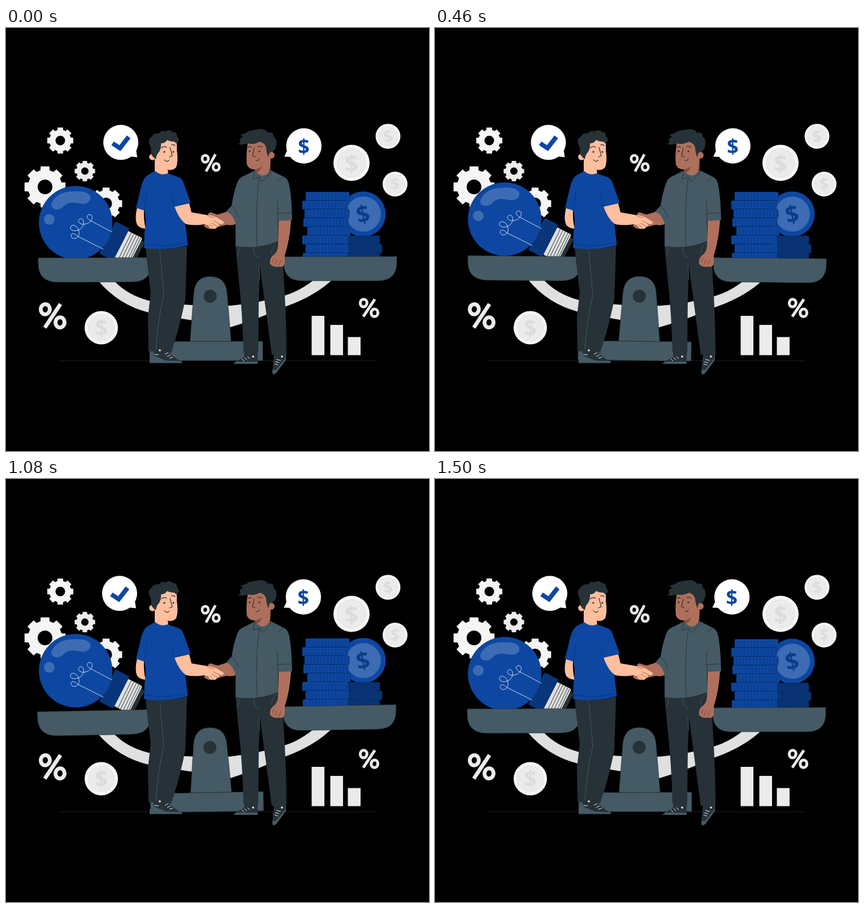
An HTML page that plays this animation: 748x748 px, repeating every 1.54 s.

```html
<!DOCTYPE html>
<html lang="en">
<head>
<meta charset="utf-8">
<title>Balance</title>
<style>
html, body { margin: 0; height: 100%; overflow: hidden; background: #000; }
svg { display: block; width: 100vw; height: 100vh; }
text { font: 700 42px "Open Sans", sans-serif; text-anchor: middle; }
.blue { fill: #0d47a1; }
.slate { fill: #455a64; }
.dark { fill: #263238; }
.skin { fill: #ffbe9d; }
.tan { fill: #ae705c; }
.edge { stroke: #263238; stroke-width: .7; }
.line { fill: none; stroke: #263238; stroke-width: .9; stroke-linecap: round; stroke-linejoin: round; }
.lace { fill: none; stroke: #eee; stroke-width: 1; }
</style>
</head>
<body>
<svg viewBox="0 0 748 748">
  <path d="M93 588.5H655" stroke="#263238" stroke-width=".7"/>
  <g id="backdrop"></g>
  <path fill="#ebebeb" d="M540.5 509H563V578.5H540.5ZM573.5 525H596V578.5H573.5ZM604.5 546.5H627V578.5H604.5Z"/>

  <g id="bulb">
    <g transform="translate(123 344) rotate(27)">
      <rect x="114" y="-24" width="11" height="42" rx="4" class="dark"/>
      <rect x="88" y="-29" width="30" height="54" rx="3" fill="#e0e0e0"/>
      <path class="line" d="M96 -29L97 25M101 -29L102 25M106 -29L107 25M111 -29L112 25M115 -28L116 24"/>
      <rect x="62" y="-34" width="28" height="64" rx="3" fill="#09357a"/>
    </g>
    <circle cx="123.2" cy="344.3" r="65" class="blue"/>
    <g fill="#fff" opacity=".2">
      <path d="M80 312C85 297 100 289 118 289C135 287 147 291 149 298C151 309 138 313 128 310C115 307 108 309 101 316C94 324 80 322 80 312Z"/>
      <circle cx="76.5" cy="338.5" r="9.5"/>
    </g>
    <path fill="none" stroke="#fff" stroke-width=".8" d="M188 361L150 341C140 336 143 329 149 330C156 332 152 343 143 346C131 350 125 342 130 338C136 334 141 345 134 353C127 361 113 360 114 352C116 345 128 350 129 360C131 370 122 375 117 371C112 366 118 359 126 368L172 391"/>
  </g>

  <g id="money">
    <circle cx="631.5" cy="329" r="40" class="blue"/>
    <circle cx="632" cy="329" r="31" fill="#3d6cb4"/>
    <text x="631" y="344" transform="rotate(-12 631 329)" fill="#0b3d8b">$</text>
  </g>

  <g id="scale">
    <path fill="#e0e0e0" d="M164 448Q200 490 252 503Q285 510 330 517L361 530L397 529Q450 513 493 493Q545 475 577 445H545Q520 465 493 473Q450 486 397 491L330 490Q285 488 252 482Q215 472 192 448Z"/>
    <g class="slate edge">
      <path d="M57 406.5L257 405.9V417Q257 449 222 449L89 449.5Q57 448 57 416Z"/>
      <path d="M491 404.5L691 404V414Q691 447 658 447H523Q491 447 491 414Z"/>
      <path d="M254 554.5L454 554V588H254Z"/>
      <path d="M325.5 554L332 470Q334 439.5 361 439.5Q389 439.5 391 470L398 554Z"/>
    </g>
    <circle cx="361" cy="474.5" r="11.5" class="dark"/>
  </g>

  <g id="check">
    <path fill="#fff" d="M230 215L232 228.5L218 227Z"/>
    <circle cx="203" cy="202.3" r="31" fill="#fff"/>
    <path fill="none" stroke="#0d47a1" stroke-width="8" d="M188.5 204L201.5 212.5L217 192.5"/>
  </g>
  <g id="price">
    <path fill="#fff" d="M498 215L492 227.5L508 228Z"/>
    <circle cx="526.7" cy="208.5" r="31.2" fill="#fff"/>
    <text x="526.5" y="221.5" style="font-size:36px" class="blue">$</text>
  </g>

  <g id="left-man">
    <path class="slate" d="M254 585L262 570L284 569Q296 583 311 590V592.5H254Z"/>
    <path class="dark" d="M261 571L284 569Q296 583 309 589L283 588L261 579Z"/>
    <path class="lace" d="M281 577l6 -3M285 581l6 -3M289 584l6 -2M262 577l8 1"/>
    <path class="dark" d="M247 389Q285 394 320 385Q319 430 317 480Q307 530 292 574Q272 571 252 572L251 510L256 468Q250 420 247 389Z"/>
    <path class="line" style="stroke:#4a5a62" d="M272 394L279 472Q268 520 265 568"/>
    <circle cx="272" cy="570" r="1.8" fill="#eee"/>
    <path class="skin" d="M232 317L244 321Q243 340 247 355Q236 354 232 348Q227 338 232 317Z"/>
    <path class="skin" d="M263 206L272 194H300Q303 206 302 215Q305 235 301 246Q297 252 286 250.5L287 258Q276 265 263 257Z"/>
    <path fill="#eb996e" d="M278 247Q284 251 297 250Q292 252 286 251Z"/>
    <circle cx="259" cy="228" r="5.8" class="skin"/>
    <path class="dark" d="M256 222Q258 213 254 207Q250 197 257 193Q261 185 271 186Q275 180 282 183Q290 178 295 184Q303 184 302 191Q308 197 304 202Q301 206 298 201Q290 201 285 198Q281 204 274 204Q275 212 271 219Q266 223 265 232Q260 229 256 222Z"/>
    <path class="line" d="M275 212Q279 208 284 211M293 207Q296 205 299 208M290 211L294 226L289 228M280 233Q284 238 288 234" style="stroke-width:1.2"/>
    <circle cx="280" cy="219" r="1.6" class="dark"/><circle cx="296" cy="219" r="1.6" class="dark"/>
    <path class="blue" d="M264 253L250 260.500Q243 265 239.500 279L230 318L245 323Q249 345 245 360L244 389Q284 395 321.500 384L317 345L298 316L326.500 309L314 274Q311 265 303 263L286 257Q274 262 264 253Z"/>
    <path class="line" d="M245 323L249 290M298 316L291 292M246 382Q285 389 320 379" style="stroke:#0a347a"/>
  </g>

  <g id="right-man">
    <path class="slate" d="M420 573H445V594H402Q408 588 420 582Z"/>
    <path class="dark" d="M421 573H445V590H404Q412 587 421 582Z"/>
    <path class="slate" d="M475 575L495 576V587L478 610Q471 616 471 608Z"/>
    <path class="dark" d="M476 575L494 576V584L477 605L472 604Z"/>
    <path class="lace" d="M417 585l4 4M422 583l4 4M427 581l4 4M476 590l7 2M475 594l6 2M478 586l8 2"/>
    <circle cx="437" cy="581" r="1.8" fill="#eee"/><circle cx="488" cy="581" r="1.8" fill="#eee"/>
    <path class="dark" d="M406 386Q445 392 481 377Q491 400 491 440Q496 510 496 577L470 578L449 421L447 480L446 574H420Q418 500 411 440Z"/>
    <path class="line" style="stroke:#4a5a62" d="M447 421L449 445M438 388Q437 403 447 405M412 390Q412 402 408 404M477 381Q470 390 469 398"/>
    <path class="tan" d="M482 340L504 340Q502 375 493 402V416Q491 424 483 422Q472 424 467 417Q466 408 471 403Q480 398 481 385Z"/>
    <path class="line" style="stroke:#70412f" d="M471 414L474 407M476 418L479 410M483 419L486 411"/>
    <path class="tan" d="M428 199Q424 225 426 242Q431 251 440 250L439 258Q455 270 467 254L468 230L465 198Z"/>
    <path fill="#84503f" d="M440 250Q448 249 453 244Q449 257 440 256Z"/>
    <circle cx="469" cy="225" r="6" class="tan"/>
    <path class="dark" d="M410 205Q416 203 414 200Q411 196 419 193Q416 188 412 189Q424 187 428 183Q437 180 443 180Q457 176 463 185Q474 183 473 192Q480 197 478 207Q477 215 471 219Q465 217 464 229Q460 219 460 211Q457 203 449 201Q438 207 427 204Q419 208 410 205Z"/>
    <path class="line" d="M428 211Q431 208 434 211M445 210Q449 208 453 211M439 212L436 226L441 228M442 234Q446 236 448 231" style="stroke-width:1.2"/>
    <circle cx="431" cy="218" r="1.6" class="dark"/><circle cx="448" cy="218" r="1.6" class="dark"/>
    <path class="slate" d="M440 252L418 263Q411 266 408 276Q402 293 399 314L388 326Q400 332 406 348L406 386Q445 392 481 377V341L506 340Q505 295 500 274Q498 266 489 262L467 251Q455 270 440 252Z"/>
    <path class="line" d="M440 252L437 268L448 263L453 272L468 257L466 250M448 264Q441 310 444 388M399 314Q408 322 411 334M481 341L480 305M480 328L505 327M480 272L492 262"/>
  </g>

  <g id="handshake">
    <path class="tan" d="M390 325Q401 329 406 346Q402 350 390 348L362 355Q354 355 350 350L357 333Q356 327 362 326L374 330Z"/>
    <path class="skin" d="M298 316L324 310L328 326L357 331Q366 331 374 336L384 342Q388 346 380 347L376 346Q378 351 374 351Q372 356 366 355Q360 356 358 349L351 347Q335 350 319 347Q307 340 298 316Z"/>
    <path class="line" style="stroke:#a45d40" d="M364 345L374 351M361 348L367 355M367 341L377 346M357 332Q361 335 368 335"/>
  </g>
</svg>
<script>
const $ = id => document.getElementById(id);
const add = (id, markup) => $(id).insertAdjacentHTML('beforeend', markup);

function gear(x, y, r, hole, fill) {
  const at = (radius, a) => `${x + radius * Math.sin(a)} ${y - radius * Math.cos(a)}`;
  const body = r * .82;
  let d = '';
  for (let i = 0; i < 8; i++) {
    const a = i * Math.PI / 4;
    d += `${i ? 'L' : 'M'}${at(body, a - .27)}L${at(r, a - .21)}L${at(r, a + .21)}L${at(body, a + .27)}`;
  }
  d += `ZM${x - hole} ${y}a${hole} ${hole} 0 1 0 ${2 * hole} 0a${hole} ${hole} 0 1 0 ${-2 * hole} 0Z`;
  add('backdrop', `<path d="${d}" fill="${fill}" fill-rule="evenodd"/>`);
}

function paleCoin(x, y, r, tilt) {
  add('backdrop', `<g transform="translate(${x} ${y}) scale(${r / 32}) rotate(${tilt})">
    <circle r="32" fill="#f5f5f5"/><circle r="25" fill="#ebebeb" stroke="#e0e0e0"/>
    <text y="15" fill="#dcdcdc">$</text></g>`);
}

function percent(x, y, scale, tilt) {
  add('backdrop', `<g transform="translate(${x} ${y}) scale(${scale}) rotate(${tilt})" fill="none" stroke="#ebebeb" stroke-width="6.8">
    <ellipse cx="-14" cy="-10.5" rx="8" ry="9"/><ellipse cx="14" cy="10.5" rx="8" ry="9"/>
    <path d="M12 -22L-12 22"/></g>`);
}

function stackCoin(x, y, width, fill) {
  let ridges = '';
  for (let i = 5; i < width; i += 6) ridges += `M${x + i} ${y + 3}v10`;
  add('money', `<rect x="${x}" y="${y}" width="${width}" height="15.4" rx="1.5" fill="${fill}" stroke="#08306e" stroke-width=".7"/>
    <path d="${ridges}M${x + 4} ${y + 14.5}h${width - 10}" stroke="#09347a"/>`);
}

gear(69, 281, 37, 13, '#f5f5f5');
gear(96, 199, 23.5, 8.5, '#f5f5f5');
gear(139.5, 253, 18.5, 6.5, '#ebebeb');
gear(177, 310.5, 29, 10.5, '#f5f5f5');
paleCoin(611, 238.5, 32, 0);
paleCoin(675.5, 191.5, 22, -12);
paleCoin(688, 276, 22, 0);
paleCoin(168.5, 530, 29.5, 0);
percent(362, 238.5, .69, 0);
percent(82.5, 509, 1, 5);
percent(642, 495, .74, 5);
[602, 606, 602].forEach((x, i) => stackCoin(x, 367.5 + i * 15.3, 59, '#093272'));
[[530, 77], [524, 80], [528, 79], [526, 79], [533, 76], [524, 81], [530, 76], [525, 80], [528, 78]]
  .forEach(([x, width], i) => stackCoin(x, 290 + i * 15.4, width, '#0d47a1'));

// Linear interpolation through [time, value] pairs
function track(t, keys) {
  let i = 1;
  while (i < keys.length - 1 && t > keys[i][0]) i++;
  const [t0, v0] = keys[i - 1], [t1, v1] = keys[i];
  return v0 + (v1 - v0) * Math.min(1, Math.max(0, (t - t0) / (t1 - t0)));
}

const LOOP = 1540, CYCLE = 1500;
const swing = [[0, 0], [375, 1], [1125, -1], [1500, 0]];
const float = [[0, 0], [750, -10], [1500, 0]];
const shake = [0, -1, 2, -4, 4, -4, 4, -4, 2, -1, 0].map((x, i) => [i * 150, x]);
const nudge = [[1000, 0], [1115, -1], [1330, -1], [1500, -1.6]];

function draw(now) {
  const raw = Math.min(now % LOOP, CYCLE);
  const t = raw + 20 * Math.sin(Math.PI * raw / CYCLE);
  const move = (id, x, y) => $(id).setAttribute('transform', `translate(${x} ${y})`);
  $('scale').setAttribute('transform', `rotate(${track(t, swing)} 374 497)`);
  move('bulb', 0, track(t, float));
  move('money', 0, track(t - 500, float));
  move('check', track(t, shake), 0);
  move('price', track(t, nudge), 0);
}

const start = performance.now();
(function tick() {
  draw(performance.now() - start);
  requestAnimationFrame(tick);
})();
</script>
</body>
</html>
```
